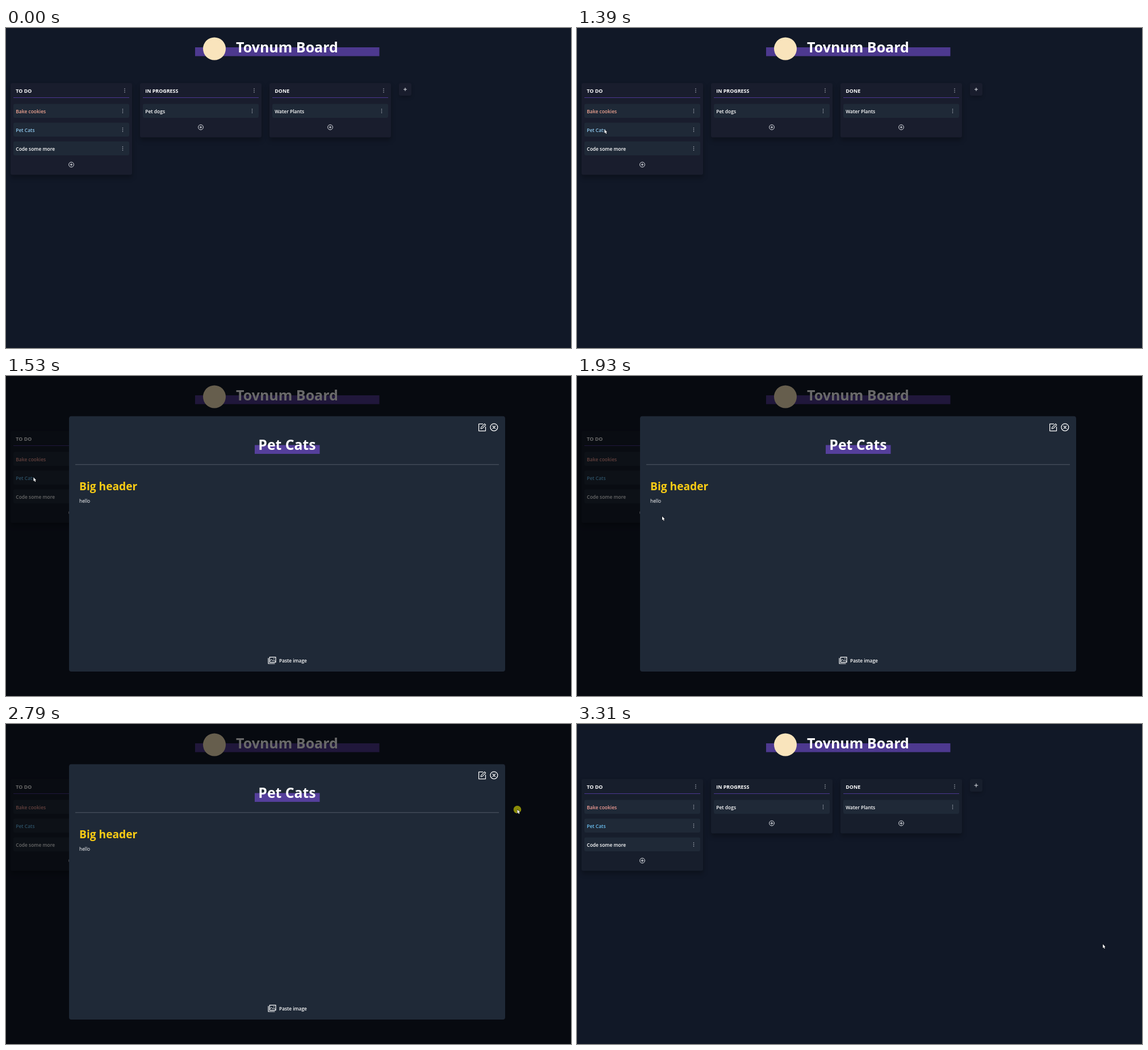
These frames come from a looping animation (995x563 px, 3380 ms). An HTML page with a canvas:

```html
<!DOCTYPE html>
<html lang="en">
<head>
<meta charset="utf-8">
<title>Task board</title>
<style>
  html, body { margin: 0; width: 100%; height: 100%; overflow: hidden; background: #111827; }
  canvas { display: block; width: 995px; height: 563px; }
</style>
</head>
<body>
<canvas id="stage" width="995" height="563"></canvas>
<script>
const ctx = document.getElementById('stage').getContext('2d');
const W = 995, H = 563, LOOP = 3380;
const OPEN = 1530, CLOSE = 2850;
const CLICKS = [[1460, OPEN], [2790, CLOSE]];
const FAMILY = '"Open Sans", "Noto Sans", sans-serif';
const ICON = '#e2e5ea';

// Pointer samples: time, x, y. Each pose holds until the next one.
const POINTER = [
  [930, 10, 220], [1000, 29, 206], [1060, 40, 193], [1120, 46, 183], [1190, 48, 179], [1390, 48.5, 178.5],
  [1860, 66, 190], [1930, 150, 247], [1990, 280, 320], [2060, 420, 350], [2120, 552, 340],
  [2190, 667, 302.5], [2260, 795, 227], [2320, 877, 174],
  [2390, 892, 160], [2460, 898, 153], [2520, 900.5, 150.5],
  [3110, 902, 164], [3180, 910, 240], [3240, 920, 334], [3310, 926, 387.5]
];

const COLUMNS = [
  { x: 8, name: 'TO DO', cards: ['Bake cookies', 'Pet Cats', 'Code some more'] },
  { x: 236, name: 'IN PROGRESS', cards: ['Pet dogs'] },
  { x: 464, name: 'DONE', cards: ['Water Plants'] }
];

function text(str, x, y, size, weight, color = '#fff', align = 'left') {
  ctx.font = `${weight} ${size}px ${FAMILY}`;
  ctx.textAlign = align;
  ctx.fillStyle = color;
  ctx.fillText(str, x, y);
}

function rect(x, y, w, h, color, radius = 0) {
  ctx.fillStyle = color;
  ctx.beginPath();
  ctx.roundRect(x, y, w, h, radius);
  ctx.fill();
}

function disc(x, y, r, color) {
  ctx.fillStyle = color;
  ctx.beginPath();
  ctx.arc(x, y, r, 0, Math.PI * 2);
  ctx.fill();
}

function ring(x, y, r, width, color) {
  ctx.strokeStyle = color;
  ctx.lineWidth = width;
  ctx.beginPath();
  ctx.arc(x, y, r, 0, Math.PI * 2);
  ctx.stroke();
}

function stroke(path, width, color) {
  ctx.strokeStyle = color;
  ctx.lineWidth = width;
  ctx.stroke(new Path2D(path));
}

function withShadow(alpha, blur, dy, draw) {
  ctx.save();
  ctx.shadowColor = `rgba(0,0,0,${alpha})`;
  ctx.shadowBlur = blur;
  ctx.shadowOffsetY = dy;
  draw();
  ctx.restore();
}

function plus(x, y, r, width = 1) {
  stroke(`M${x - r} ${y}h${2 * r}M${x} ${y - r}v${2 * r}`, width, ICON);
}

function kebab(x, y, gap) {
  for (const i of [-1, 0, 1]) disc(x, y + i * gap, 0.75, '#c3c8d0');
}

function drawBoard(t) {
  const early = t < OPEN;
  const panel = early ? '#191d2d' : '#171e2c';
  const inks = {
    'Bake cookies': early ? '#f0a491' : '#f09c94',
    'Pet Cats': early ? '#8fc8ee' : '#6bc0f2'
  };
  rect(0, 0, W, H, '#111827');
  rect(333, 34, 324.5, 15.5, '#4d398f');
  disc(367, 36.5, 20, '#f9e4bc');
  text('Tovnum Board', 405, 43, 25, 700);

  for (const { x, name, cards } of COLUMNS) {
    const height = 62.5 + 32.9 * cards.length;
    withShadow(0.3, 9, 5, () => rect(x, 97, 214, height, panel, 3));
    text(name, x + 9.3, 113.8, 8.9, 700);
    kebab(x + 201, 110, 3.1);
    rect(x + 5, 121.9, 204, 1.2, '#4b3791');
    cards.forEach((card, i) => {
      const y = 133.5 + 33 * i;
      rect(x + 5, y, 204, 24.5, '#1f2937', 3);
      text(card, x + 9.3, y + 16.3, 8.45, 600, inks[card]);
      kebab(x + 197.5, y + 12.5, 2.9);
    });
    const addY = 141.7 + 32.9 * cards.length;
    ring(x + 107, addY, 4.4, 1, ICON);
    plus(x + 107, addY, 2.2);
  }

  withShadow(0.2, 6, 3, () => rect(692, 97, 22, 22, panel, 3));
  plus(703, 108, 2.9);
}

function drawModal() {
  rect(0, 0, W, H, 'rgba(0,0,0,.59)');
  rect(111, 70.7, 768, 449.3, '#1f2937', 4);

  ctx.lineJoin = ctx.lineCap = 'round';
  stroke('M839.5 84.4H832.6V96.5H844.5V89.5', 1.25, '#fff');
  stroke('M836.2 92.9l.5-2.6 6.1-6.1 2 2-6.1 6.1z', 1.1, '#fff');
  ring(859.4, 90.2, 6.4, 1.25, '#fff');
  stroke('M857.2 88l4.4 4.4m0-4.4l-4.4 4.4', 1.25, '#fff');

  rect(438, 121.5, 114.5, 15.5, '#553f9b');
  text('Pet Cats', 495, 130, 24.8, 700, '#fff', 'center');
  rect(122, 155, 746, 1.6, '#414a57');
  text('Big header', 129, 201, 19.2, 700, '#facc15');
  text('hello', 129, 222.7, 8.4, 400);

  stroke('M464.3 494.6h10.7v9h-10.7zM462 496.6v9.4h11', 1.2, '#fff');
  stroke('M464.5 501.3l3-2.6 2.4 2.4 1.7-1.4 3.2 2.7', 1, '#fff');
  disc(471.8, 497.3, 0.8, '#fff');
  text('Paste image', 481, 504.3, 8.35, 600);
}

function drawPointer(t) {
  const pose = POINTER.findLast(([start]) => start <= t);
  if (!pose) return;
  const [, x, y] = pose;
  if (CLICKS.some(([from, to]) => t >= from && t < to)) disc(x, y, 6.8, 'rgba(255,255,0,.53)');
  const arrow = new Path2D(`M${x} ${y}v6.6l1.5-1.3 1.1 2.4 1.2-.5-1.1-2.4h2z`);
  ctx.strokeStyle = '#0a0c12';
  ctx.lineWidth = 1;
  ctx.stroke(arrow);
  ctx.fillStyle = '#fff';
  ctx.fill(arrow);
}

const begin = performance.now();

function frame() {
  const t = (performance.now() - begin) % LOOP;
  drawBoard(t);
  if (t >= OPEN && t < CLOSE) drawModal();
  drawPointer(t);
  requestAnimationFrame(frame);
}
frame();
</script>
</body>
</html>
```
